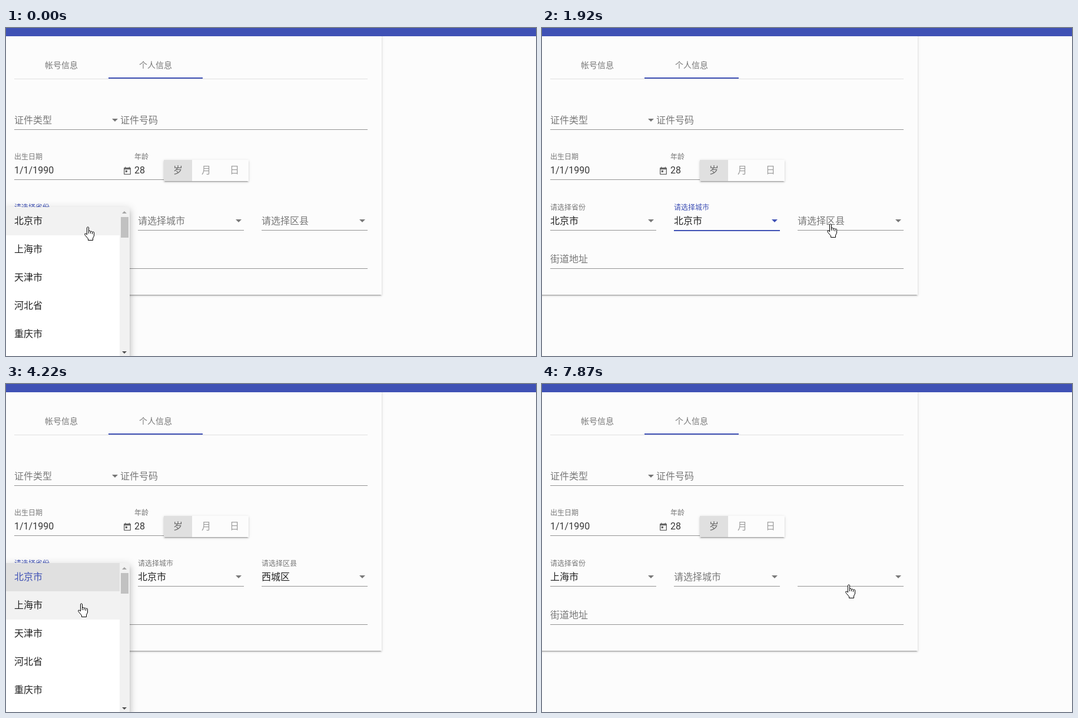
An HTML page that plays this animation: 900 px wide and 557 px high, repeating every 8000 ms.

```html
<!DOCTYPE html>
<html lang="zh-CN">
<head>
<meta charset="utf-8">
<style>
html, body { margin: 0; width: 100%; height: 100%; overflow: hidden; background: #fcfcfc; }
body { position: relative; font: 350 16px/18px Roboto, "Noto Sans CJK SC", "Noto Sans CJK", sans-serif; }
div, svg { position: absolute; white-space: nowrap; }
.card, .toggle { background: #fcfcfc; box-shadow: 0 3px 1px -2px rgba(0,0,0,.2), 0 2px 2px rgba(0,0,0,.14), 0 1px 5px rgba(0,0,0,.12); }
.toggle div { line-height: 36px; text-align: center; color: rgba(0,0,0,.38); }
.toggle .on { background: #e0e0e0; color: rgba(0,0,0,.54); }
.blue { background: #3f51b5; }
.rule { background: #e0e0e0; }
.line { background: #949494; }
.hint { color: rgba(0,0,0,.52); transform-origin: 0 0; }
.small { font-size: 12px; }
.tab { font-size: 14px; text-align: center; color: rgba(0,0,0,.52); }
.value { color: rgba(0,0,0,.87); }
.digits { color: rgba(0,0,0,.78); font-weight: 400; }
.arrow { border: 5px solid transparent; border-bottom: 0; border-top-color: currentColor; color: rgba(0,0,0,.54); }
.menu { background: #fff; border-radius: 2px; transform-origin: 50% 24px; box-shadow: 0 5px 5px -3px rgba(0,0,0,.2), 0 8px 10px 1px rgba(0,0,0,.14), 0 3px 14px 2px rgba(0,0,0,.12); }
.list { overflow: hidden; border-radius: 2px; }
.row { line-height: 48px; text-indent: 16px; overflow: hidden; }
.ripple { border-radius: 50%; background: rgba(0,0,0,.1); }
.track { background: #f1f1f1; }
.thumb { background: #c1c1c1; }
.tip { border: 4px solid transparent; border-bottom: 0; border-top-color: #505050; }
.tip.up { border-top: 0; border-bottom: 4px solid #a3a3a3; }
</style>
</head>
<body>
<script>
const LOOP = 8000, MENU_Y = 304, ROW = 48, MENU_W = 212, MENU_H = 256, BAR = 17, PRESS = 60;

function add(cls, x, y, w, h, text = '', parent = document.body) {
  const e = document.createElement('div');
  e.className = cls;
  e.textContent = text;
  e.style.left = x + 'px';
  e.style.top = y + 'px';
  if (w) e.style.width = w + 'px';
  if (h) e.style.height = h + 'px';
  parent.append(e);
  return e;
}

function addSvg(x, y, w, h, viewBox, body) {
  document.body.insertAdjacentHTML('beforeend',
    `<svg style="left:${x}px;top:${y}px" width="${w}" height="${h}" viewBox="${viewBox}">${body}</svg>`);
  return document.body.lastElementChild;
}

// Form field standing on a line at height y
function addField(x, y, w, label, value) {
  add('line', x, y, w, 1);
  if (value) {
    add('hint small', x, y - 47, 0, 0, label);
    add('digits', x, y - 24, 0, 0, value);
  } else {
    return add('hint', x, y - 24, 0, 0, label);
  }
}
const addArrow = (x, y) => add('arrow', x + 166, y - 18);

add('card', -20, 0, 658, 453);
add('blue', 0, 0, 900, 14);
add('rule', 14, 86, 600, 1);
['帐号信息', '个人信息'].forEach((s, i) => add('tab', 14 + 160 * i, 54, 160, 0, s));
add('blue', 174, 84, 160, 2);

addField(14, 172, 180, '证件类型');
addArrow(14, 172);
addField(194, 172, 420, '证件号码');
addField(14, 257, 204, '出生日期', '1/1/1990');
addSvg(198, 235, 16, 16, '0 0 24 24', '<path fill="#666" d="M19 3h-1V1h-2v2H8V1H6v2H5c-1.1 0-2 .9-2 2v14c0 1.1.9 2 2 2h14c1.1 0 2-.9 2-2V5c0-1.1-.9-2-2-2zm0 16H5V8h14v11zM7 10h5v5H7z"/>');
addField(218, 257, 50, '年龄', '28');
const toggle = add('toggle', 268, 224, 3 * ROW, 36);
['岁', '月', '日'].forEach((s, i) => add(i ? '' : 'on', ROW * i, 0, ROW, 36, s, toggle));
addField(14, 408, 600, '街道地址');

const selects = ['请选择省份', '请选择城市', '请选择区县'].map((name, i) => {
  const x = 14 + 210 * i, y = 343;
  return {
    label: addField(x, y, 180, name),
    bar: add('blue', x, y, 180, 2),
    value: add('value', x, y - 24),
    arrow: addArrow(x, y)
  };
});

// Menus in order of use; total counts the rows including those scrolled out of view
const provinces = ['北京市', '上海市', '天津市', '河北省', '重庆市'];
const districts = ['东城区', '西城区', '崇文区', '宣武区', '朝阳区'];
const menus = [
  { f: 0, items: provinces, total: 34, pick: 0, open: -999, close: 170 },
  { f: 1, items: ['北京市'], total: 1, pick: 0, open: 800, close: 1500 },
  { f: 2, items: districts, total: 18, pick: 1, open: 1930, close: 2890 },
  { f: 0, items: provinces, total: 34, pick: 1, open: 3720, close: 4955 },
  { f: 1, items: ['上海市'], total: 1, pick: -1, open: 6620, close: 7490 }
];

for (const m of menus) {
  const h = Math.min(MENU_H, m.total * ROW), scrolls = m.total * ROW > h;
  m.x = 210 * m.f - 2;
  m.w = scrolls ? MENU_W - BAR : MENU_W;
  m.box = add('menu', m.x, MENU_Y, MENU_W, h);
  const list = add('list', 0, 0, MENU_W, h, '', m.box);
  m.rows = m.items.map((s, i) => add('row', 0, ROW * i, m.w, ROW, s, list));
  if (m.pick >= 0) m.ripple = add('ripple', 0, 0, 0, 0, '', m.rows[m.pick]);
  if (scrolls) {
    add('track', m.w, 0, BAR, h, '', list);
    add('thumb', m.w + 2, BAR, BAR - 4, (h - 2 * BAR) * h / (m.total * ROW), '', list);
    add('tip up', m.w + 4, 7, 0, 0, '', list);
    add('tip', m.w + 4, h - 11, 0, 0, '', list);
  }
}

const hand = addSvg(0, 0, 18, 25, '0 0 18 25', `<g fill="#fff" stroke="#000" stroke-linejoin="round">
  <path d="M4.5 14V2Q6-1 7.5 2V8Q9 6 10.5 8.5Q12 7 13.5 9.5Q16.5 8 16.5 11V16L14.5 20V23.5H6.5V21L1 14.5Q0 11.5 2.5 12Z"/>
  <path d="M7.5 8v4M10.5 9v3M13.5 10v3"/></g>`);

// Pointer stops: arrival time, fingertip x, y
const stops = [
  [0, 139, 337], [680, 296, 323], [1900, 490, 332], [2580, 508, 392],
  [3240, 264, 335], [3700, 120, 332], [4220, 128, 372], [4610, 124, 392],
  [5250, 244, 340], [5670, 221, 329], [6600, 300, 331], [7310, 505, 336], [7870, 521, 340]
];

const clamp = v => Math.max(0, Math.min(1, v));
const ease = v => 1 - (1 - clamp(v)) ** 3;
const mix = (a, b, k) => a + (b - a) * k;
const tint = k => `rgba(${63 * k},${81 * k},${181 * k},${mix(.52, 1, k)})`;

// Each move takes up to 300 ms and ends on its arrival time
function pointer(t) {
  let [, x, y] = stops[0];
  for (const [end, nx, ny] of stops) {
    const k = clamp((t - end) / 300 + 1);
    const smooth = k * k * (3 - 2 * k);
    x = mix(x, nx, smooth);
    y = mix(y, ny, smooth);
  }
  return [x, y];
}

function drawSelects(t) {
  const values = [], cleared = [];
  for (const m of menus) {
    if (t < m.close || m.pick < 0) continue;
    if (m.f === 0 && values[0]) {
      cleared[1] = cleared[2] = m.close;
      values[1] = values[2] = '';
    }
    values[m.f] = m.items[m.pick];
  }
  const opened = menus.filter(m => m.open <= t);
  const [now, before] = opened.slice().reverse();

  selects.forEach((s, i) => {
    const last = opened.filter(m => m.f === i).pop();
    const grow = last ? ease((t - last.open) / 400) : 0;
    const drop = last && last.pick < 0 ? 1 - ease((t - last.close) / 400) : 1;
    const lift = values[i] ? 1 : grow * drop;
    const focus = now.f === i ? grow * drop
      : before && before.f === i ? 1 - ease((t - now.open) / 400) : 0;
    const hidden = cleared[i] && last.open < cleared[i];
    s.value.textContent = values[i] || '';
    s.label.style.visibility = hidden ? 'hidden' : 'visible';
    s.label.style.transform = `translateY(${-20.75 * lift}px) scale(${1 - .25 * lift})`;
    s.label.style.color = s.arrow.style.color = tint(focus);
    s.bar.style.opacity = focus;
  });
  return values;
}

function drawMenu(m, t, values, [px, py]) {
  const shown = t >= m.open && t < m.close + 350;
  m.box.style.display = shown ? 'block' : 'none';
  if (!shown) return;
  const grow = ease((t - m.open) / 150);
  m.box.style.opacity = grow * (1 - clamp((t - m.close - 100) / 250));
  m.box.style.transform = `scaleY(${grow})`;

  const done = t >= m.close;
  const inside = !done && px >= m.x && px < m.x + m.w;
  const hover = inside ? Math.floor((py - MENU_Y) / ROW) : -1;
  const active = done && m.pick >= 0 ? m.pick : 0;
  m.rows.forEach((row, i) => {
    const chosen = m.items[i] === values[m.f];
    const shade = chosen ? .12 : i === active || i === hover ? .05 : 0;
    row.style.background = `rgba(0,0,0,${shade})`;
    row.style.color = chosen ? '#3f51b5' : 'rgba(0,0,0,.87)';
  });

  if (!m.ripple) return;
  const press = m.close - PRESS;
  const [cx, cy] = pointer(press);
  const x = cx - m.x, y = cy + 5 - MENU_Y - ROW * m.pick;
  const reach = Math.hypot(Math.max(x, m.w - x), Math.max(y, ROW - y));
  const r = reach * ease((t - press) / 315);
  Object.assign(m.ripple.style, {
    left: x - r + 'px', top: y - r + 'px', width: 2 * r + 'px', height: 2 * r + 'px'
  });
}

function draw(t) {
  const at = pointer(t);
  const values = drawSelects(t);
  menus.forEach(m => drawMenu(m, t, values, at));
  hand.style.left = Math.round(at[0] - 6) + 'px';
  hand.style.top = Math.round(at[1]) + 'px';
}

const start = performance.now();
function tick() {
  draw((performance.now() - start) % LOOP);
  requestAnimationFrame(tick);
}
tick();
</script>
</body>
</html>
```
